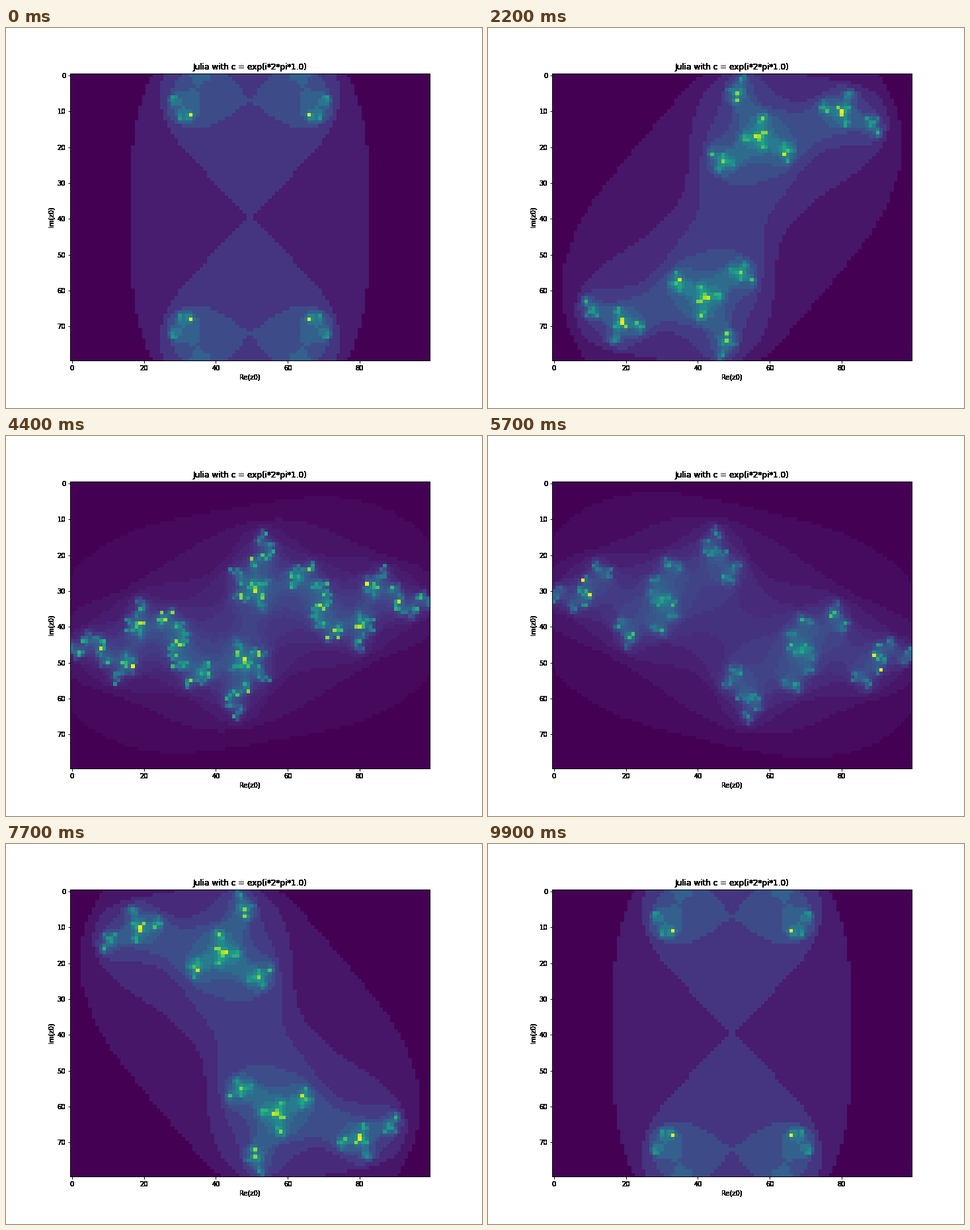
A matplotlib script that plays this animation: 720 by 576 pixels, repeating every 10000 ms.

```python
import matplotlib.pyplot as plt
import numpy as np
from matplotlib.animation import FuncAnimation

FRAMES = 100
WIDTH, HEIGHT = 100, 80
MAX_ITER = 100

plt.rcParams.update({
    "font.family": "DejaVu Sans",
    "font.size": 10,
    "axes.linewidth": 1,
    "xtick.major.width": 1,
    "ytick.major.width": 1,
    "figure.subplot.left": 0.125,
    "figure.subplot.right": 0.9,
    "figure.subplot.bottom": 0.125,
    "figure.subplot.top": 0.88,
})

x = np.linspace(-1.5, 1.5, WIDTH)
y = np.linspace(-1.2, 1.2, HEIGHT)
grid = x[None, :] + 1j * y[:, None]


def julia(turn):
    """Escape counts of z^2 + c with c on the unit circle."""
    c = np.exp(2j * np.pi * turn)
    z = grid.copy()
    count = np.zeros(z.shape)
    inside = np.ones(z.shape, bool)
    for _ in range(MAX_ITER):
        z[inside] = z[inside] ** 2 + c
        inside &= np.abs(z) < 2
        if not inside.any():
            break
        count += inside
    return count


def harden(text, passes=24):
    """Overprint a text so that its soft edges turn solid."""
    draw = text.draw

    def overprint(renderer):
        for _ in range(passes):
            draw(renderer)

    text.draw = overprint


fig, ax = plt.subplots(figsize=(10, 8), dpi=72, facecolor="white")
image = ax.imshow(julia(0), cmap="viridis", interpolation="nearest")
ax.set_xticks(range(0, WIDTH, 20))
ax.set_yticks(range(0, HEIGHT, 10))
ax.set_title("Julia with c = exp(i*2*pi*1.0)", fontsize=12)
ax.set_xlabel("Re(z0)")
ax.set_ylabel("Im(z0)")

labels = [ax.title, ax.xaxis.label, ax.yaxis.label]
for label in labels + ax.get_xticklabels() + ax.get_yticklabels():
    harden(label)


def update(i):
    image.set_data(julia(i / (FRAMES - 1)))
    image.autoscale()
    return [image]


anim = FuncAnimation(fig, update, frames=FRAMES, interval=100,
                     repeat=True, repeat_delay=0)
plt.show()
```
